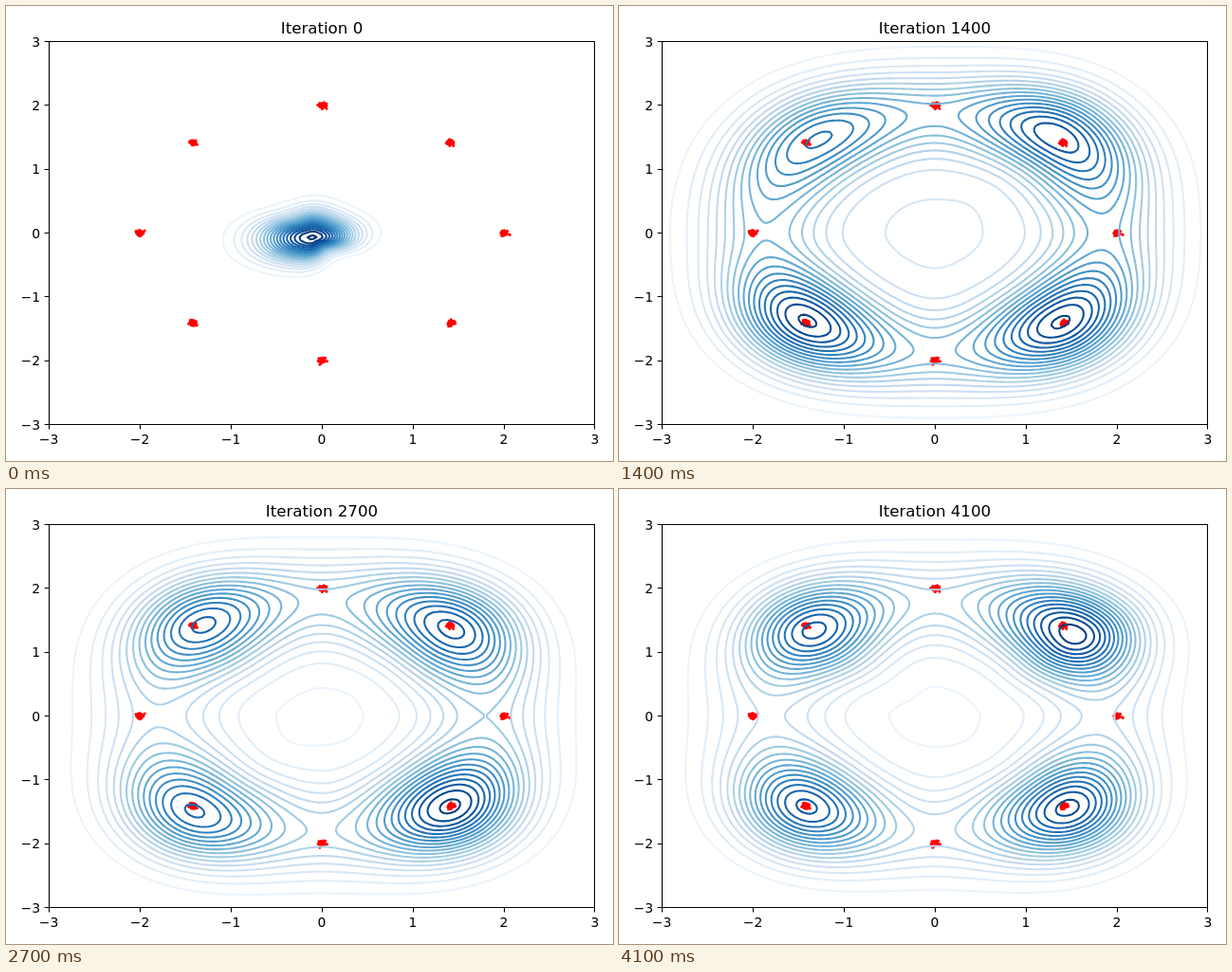
Animation, 640 px wide and 480 px high, one loop 6100 ms. Source, as an HTML page with a canvas:

```html
<!DOCTYPE html>
<html lang="en">
<head>
<meta charset="utf-8">
<title>Density contours</title>
<style>
  html, body { margin: 0; width: 100%; height: 100%; overflow: hidden; background: #fff; }
  canvas, svg { position: absolute; left: 0; top: 0; width: 640px; height: 480px; }
  text { font: 13.89px "DejaVu Sans", sans-serif; text-anchor: middle; }
  #title { font-size: 16.67px; }
  .y { text-anchor: end; }
  path { fill: none; stroke: #000; stroke-width: 1.1; }
</style>
</head>
<body>
<canvas id="plot" width="640" height="480"></canvas>
<svg id="axes" viewBox="0 0 640 480">
  <path d="M45.5 37.5H620.5V441.5H45.5Z"/>
  <text id="title" x="333" y="29">Iteration 0</text>
</svg>
<script>
const FRAME = 100, LAST = 41, LOOP = 6100;
const BOX = { x: 45, y: 37, w: 576, h: 405 };
const TOP_LEVEL = 19, CELL = 3, OUTER_WIDTH = 0.5;
const BLUES = ['f7fbff', 'deebf7', 'c6dbef', '9ecae1', '6baed6', '4292c6', '2171b5', '08519c', '08306b']
  .map(hex => [0, 2, 4].map(i => parseInt(hex.substr(i, 2), 16)));

// Ridge heights run counter-clockwise from east; peaks are the four diagonal
// summits; shape is ring radius, inner width, height of the middle, blob share.
const KEYS = [
  { at: 0, ridge: Array(8).fill(19.2), peaks: [.001, .001, -.001, .001, -.001, -.001, .001, -.001], shape: [0, .5, 19.2, 1] },
  { at: 900, ridge: [12.5, 14.6, 12.6, 12.8, 13, 18.5, 11.4, 18.4], peaks: [1.4, 1.46, -1.38, 1.44, -1.4, -1.44, 1.43, -1.38], shape: [1.88, .62, 3.3, 0] },
  { at: 1400, ridge: [9.5, 16.8, 9.5, 14.2, 8.9, 18.2, 8.6, 18.2], peaks: [1.33, 1.52, -1.27, 1.47, -1.4, -1.38, 1.38, -1.4], shape: [1.86, .46, 2.9, 0] },
  { at: 2100, ridge: [8.6, 17.3, 9.2, 16.2, 8.3, 17.4, 8.8, 18.3], peaks: [1.5, 1.36, -1.29, 1.42, -1.31, -1.39, 1.45, -1.27], shape: [1.76, .51, 1.7, 0] },
  { at: 2700, ridge: [7, 16.4, 7.5, 15.3, 5.8, 15.2, 6.8, 18.3], peaks: [1.43, 1.36, -1.3, 1.43, -1.4, -1.49, 1.41, -1.42], shape: [1.8, .53, .75, 0] },
  { at: 3300, ridge: [5.5, 18.1, 6.6, 15.4, 4.3, 13.2, 5.4, 18.3], peaks: [1.3, 1.37, -1.41, 1.41, -1.53, -1.53, 1.37, -1.38], shape: [1.82, .51, .75, 0] },
  { at: 4100, ridge: [5.3, 18.6, 6.4, 16.4, 5.2, 16.3, 5.6, 17.4], peaks: [1.53, 1.27, -1.33, 1.34, -1.41, -1.42, 1.46, -1.44], shape: [1.8, .5, .85, 0] }
];

const ctx = document.getElementById('plot').getContext('2d');
const axes = document.getElementById('axes');
const title = document.getElementById('title');
const toX = x => 333 + 96 * x;
const toY = y => 239.5 - 67.3 * y;
const mix = (a, b, t) => a + (b - a) * t;
const mixAll = (a, b, t) => a.map((v, i) => mix(v, b[i], t));
const bell = z => Math.exp(-z * z / 2);

function svg(tag, attrs, text = '') {
  const node = document.createElementNS('http://www.w3.org/2000/svg', tag);
  for (const name in attrs) node.setAttribute(name, attrs[name]);
  node.textContent = text;
  axes.append(node);
}

for (let n = -3; n <= 3; n++) {
  const x = Math.min(Math.floor(toX(n)) + .5, 620.5);
  const y = Math.floor(toY(n)) + .5;
  const label = String(n).replace('-', '\u2212');
  svg('path', { d: `M${x} 442v4.4M45 ${y}h-4.4` });
  svg('text', { x: toX(n), y: 462 }, label);
  svg('text', { x: 36, y: toY(n) + 5.2, class: 'y' }, label);
}

function blues(t) {
  const p = t * (BLUES.length - 1);
  const i = Math.min(Math.floor(p), BLUES.length - 2);
  return `rgb(${mixAll(BLUES[i], BLUES[i + 1], p - i).map(Math.round)})`;
}

function makeRandom(seed) {
  return () => (seed = seed * 16807 % 2147483647) / 2147483647;
}

function makeSamples() {
  const random = makeRandom(4711);
  const path = new Path2D();
  for (let i = 0; i < 8; i++) {
    for (let j = 0; j < 75; j++) {
      const r = .02 * Math.sqrt(-2 * Math.log(random()));
      const a = 2 * Math.PI * random();
      const x = toX(2 * Math.cos(i * Math.PI / 4) + r * Math.cos(a));
      const y = toY(2 * Math.sin(i * Math.PI / 4) + r * Math.sin(a));
      path.moveTo(x + 1.5, y);
      path.arc(x, y, 1.5, 0, 7);
    }
  }
  return path;
}
const samples = makeSamples();

function stateAt(iteration) {
  const i = Math.max(1, KEYS.findIndex(k => k.at >= iteration));
  const a = KEYS[i - 1], b = KEYS[i];
  const t = (iteration - a.at) / (b.at - a.at);
  const part = name => mixAll(a[name], b[name], t);
  return { ridge: part('ridge'), peaks: part('peaks'), shape: part('shape') };
}

function blobWidth(a) {
  return .285 - .05 * Math.cos(a) + .016 * Math.sin(a)
    + .05 * Math.cos(2 * a) + .03 * Math.sin(2 * a) + .02 * Math.cos(4 * a);
}

// A ridge around the middle, with bell-shaped slopes inwards and outwards.
function makeDensity({ ridge, peaks, shape: [ring, inner, core, blob] }) {
  const turn = 2 * Math.PI;
  const nodes = ridge.map((height, i) => {
    const x = peaks[i - 1], y = peaks[i];
    return i % 2
      ? { angle: (Math.atan2(y, x) + turn) % turn, radius: Math.hypot(x, y), log: Math.log(height) }
      : { angle: i * Math.PI / 4, radius: ring, log: Math.log(height) };
  });
  nodes.push({ ...nodes[0], angle: turn });

  return (px, py) => {
    const x = px + .1 * blob, y = py + .07 * blob;
    const r = Math.hypot(x, y);
    const a = (Math.atan2(y, x) + turn) % turn;
    let i = 0;
    while (i < 7 && a > nodes[i + 1].angle) i++;
    const from = nodes[i], to = nodes[i + 1];
    const t = (1 - Math.cos(Math.PI * (a - from.angle) / (to.angle - from.angle))) / 2;
    const radius = mix(from.radius, to.radius, t);
    const height = Math.exp(mix(from.log, to.log, t));
    if (r >= radius) return height * bell((r - radius) / mix(OUTER_WIDTH, blobWidth(a), blob));
    return mix(core, height, bell((radius - r) / Math.min(inner, radius / 3.1)));
  };
}

function contours(density) {
  const paths = Array.from({ length: TOP_LEVEL + 1 }, () => new Path2D());
  const cols = BOX.w / CELL, rows = BOX.h / CELL;
  const grid = [];
  for (let j = 0; j <= rows; j++) {
    grid.push(Array.from({ length: cols + 1 }, (_, i) =>
      density((BOX.x + i * CELL - 333) / 96, (239.5 - BOX.y - j * CELL) / 67.3)));
  }
  const corners = [[0, 0], [1, 0], [1, 1], [0, 1]];
  for (let j = 0; j < rows; j++) {
    for (let i = 0; i < cols; i++) {
      const values = corners.map(([u, v]) => grid[j + v][i + u]);
      const first = Math.max(1, Math.ceil(Math.min(...values)));
      const last = Math.min(TOP_LEVEL, Math.floor(Math.max(...values)));
      for (let level = first; level <= last; level++) {
        let count = 0;
        for (let e = 0; e < 4; e++) {
          const n = (e + 1) % 4, p = values[e], q = values[n];
          if (p < level === q < level) continue;
          const t = (level - p) / (q - p);
          const [u, v] = mixAll(corners[e], corners[n], t);
          const method = count++ % 2 ? 'lineTo' : 'moveTo';
          paths[level][method](BOX.x + (i + u) * CELL, BOX.y + (j + v) * CELL);
        }
      }
    }
  }
  return paths;
}

function draw(iteration) {
  title.textContent = 'Iteration ' + iteration;
  ctx.clearRect(0, 0, 640, 480);
  ctx.fillStyle = '#f00';
  ctx.fill(samples);
  ctx.save();
  ctx.beginPath();
  ctx.rect(BOX.x, BOX.y, BOX.w, BOX.h);
  ctx.clip();
  ctx.lineWidth = 2.08;
  ctx.lineCap = 'round';
  contours(makeDensity(stateAt(iteration))).forEach((path, level) => {
    ctx.strokeStyle = blues(level / TOP_LEVEL);
    ctx.stroke(path);
  });
  ctx.restore();
}

const start = performance.now();
let shown = -1;
function tick() {
  const time = (performance.now() - start) % LOOP;
  const step = Math.min(LAST, Math.floor(time / FRAME));
  if (step !== shown) draw((shown = step) * 100);
  requestAnimationFrame(tick);
}
tick();
</script>
</body>
</html>
```
